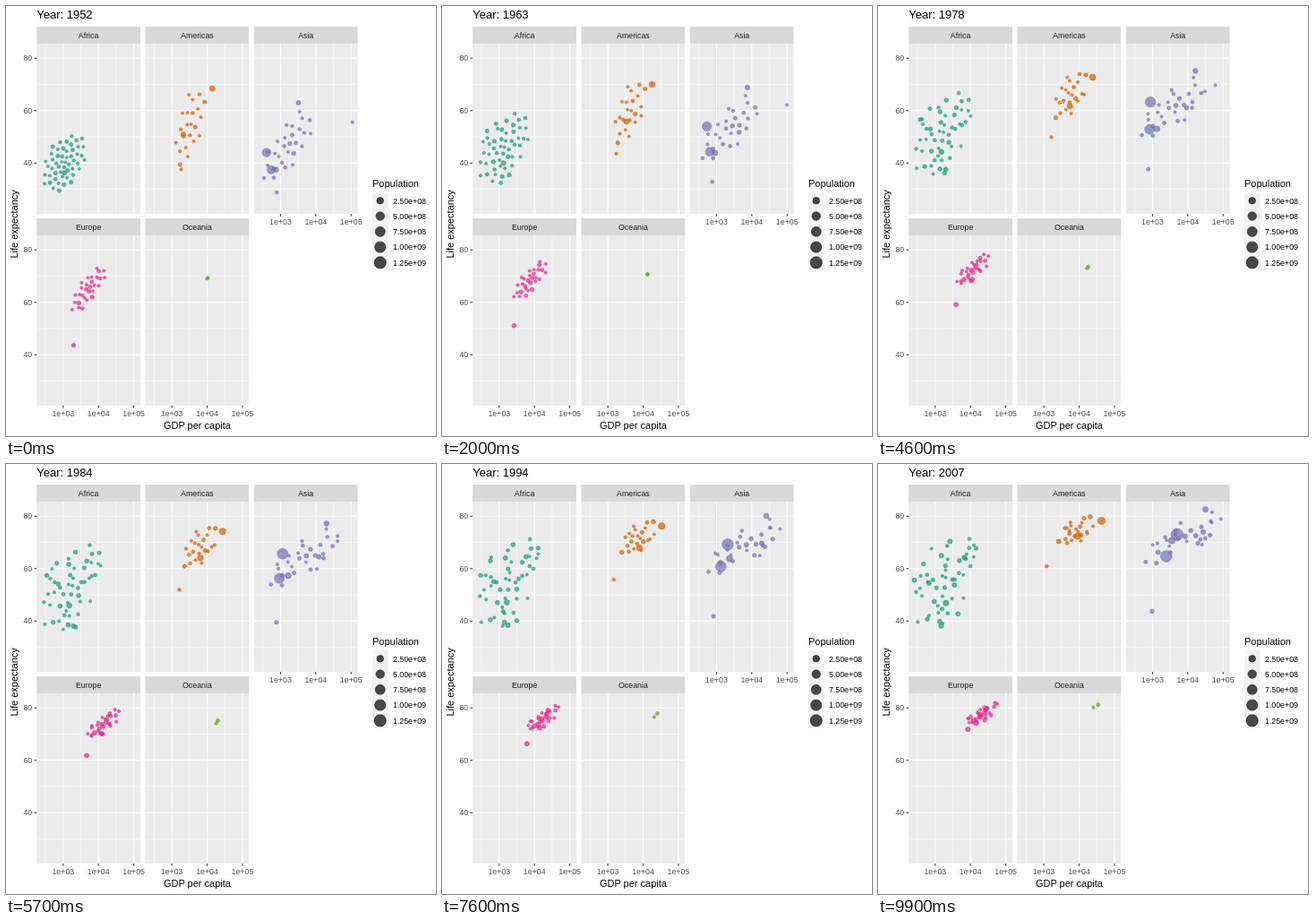
Write an HTML page that moves like this. It is 480 by 480 pixels and loops after 10000 ms.

```html
<!DOCTYPE html>
<html lang="en">
<head>
<meta charset="utf-8">
<title>Life expectancy and GDP</title>
<style>
html, body { margin: 0; width: 100%; height: 100%; overflow: hidden; background: #fff; }
svg { display: block; width: 480px; height: 480px; font-family: "Liberation Sans", Arial, sans-serif; }
</style>
</head>
<body>
<svg id="chart" viewBox="0 0 480 480"></svg>
<script>
const chart = document.getElementById("chart");
const LEFT = 34.2, TOP = 42, W = 115.8, H = 190, STEP_X = 121.3, STEP_Y = 214;

function el(tag, attrs, text) {
  const node = document.createElementNS("http://www.w3.org/2000/svg", tag);
  for (const k in attrs) node.setAttribute(k, attrs[k]);
  if (text) node.textContent = text;
  return chart.appendChild(node);
}
const rect = (x, y, width, height, fill) => el("rect", { x, y, width, height, fill });
const line = (x1, y1, x2, y2, stroke, w) => el("line", { x1, y1, x2, y2, stroke, "stroke-width": w });
const label = (x, y, s, fill = "#000", anchor = "start", size = 8.8) =>
  el("text", { x, y, fill, "text-anchor": anchor, "font-size": size }, s);
const dot = fill => el("circle", { fill, stroke: fill, "stroke-width": 0.71,
  "fill-opacity": 0.7, "stroke-opacity": 0.7 });

function place(node, cx, cy, r) {
  node.setAttribute("cx", cx);
  node.setAttribute("cy", cy);
  node.setAttribute("r", r);
}

const px = lg => (lg - 2.248) * 39.4;          // log10 of GDP
const py = life => (85.55 - life) * 2.927;
const radius = (millions, scale = 1) => 1.5 + 5.3 * scale * Math.sqrt(millions / 1319);
const mix = (a, b, f) => a + (b - a) * f;

let seed = 7;
function random() {
  seed = (seed * 16807) % 2147483647;
  return seed / 2147483647;
}

function panel(name, x, y) {
  rect(x, y - 19, W, 19, "#d9d9d9");
  label(x + W / 2, y - 6.3, name, "#1a1a1a", "middle");
  rect(x, y, W, H, "#ebebeb");
  const across = (life, w) => line(x, y + py(life), x + W, y + py(life), "#fff", w);
  const down = (lg, w) => line(x + px(lg), y, x + px(lg), y + H, "#fff", w);
  [30, 50, 70].forEach(v => across(v, 0.53));
  [2.5, 3.5, 4.5].forEach(v => down(v, 0.53));
  [40, 60, 80].forEach(v => across(v, 1.07));
  [3, 4, 5].forEach(v => down(v, 1.07));
}

function xAxis(x, y) {
  for (const e of [3, 4, 5]) {
    line(x + px(e), y, x + px(e), y + 2.75, "#333", 1.07);
    label(x + px(e), y + 12, "1e+0" + e, "#4d4d4d", "middle");
  }
}

// A country whose [GDP, life] stops are evenly spaced over the whole time span.
const along = stops => u => {
  const s = u * (stops.length - 1), i = Math.min(Math.floor(s), stops.length - 2);
  const [a, b] = [stops[i], stops[i + 1]];
  return [mix(Math.log10(a[0]), Math.log10(b[0]), s - i), mix(a[1], b[1], s - i)];
};

// Member i of a tilted cloud; from and to hold centre and spread of log GDP and life.
function member(i, { count, from, to, tilt, ease }) {
  const r = 2.2 * ((i + 0.5) / count) ** 0.6;
  const turn = 1.6 * (random() - 0.5);
  return u => {
    const f = 1 - (1 - u) ** ease;
    const [gdp, gdpSpread, life, lifeSpread] = from.map((v, k) => mix(v, to[k], f));
    const angle = 2.4 * i + turn * u;
    const zx = r * Math.cos(angle);
    const zy = tilt * zx + Math.sqrt(1 - tilt * tilt) * r * Math.sin(angle);
    return [gdp + gdpSpread * zx, life + lifeSpread * zy];
  };
}

const countries = [];

function facet(name, color, col, row, cloud, paths) {
  const x = LEFT + col * STEP_X, y = TOP + row * STEP_Y;
  panel(name, x, y);
  const add = (pop, at) => countries.push({ x, y, pop, at, node: dot(color) });
  for (let i = 0; i < cloud.count; i++) add(1 + 75 * random() ** 4, member(i, cloud));
  for (const [pop, ...stops] of paths) add(pop, along(stops));
}

facet("Africa", "#1b9e77", 0, 0,
  { count: 51, from: [3.02, 0.29, 40, 5], to: [3.25, 0.43, 55.5, 9], tilt: 0.4, ease: 2 },
  [[135, [1077, 36.3], [1500, 42.4], [1500, 47.2], [2014, 46.9]]]);

facet("Americas", "#d95f02", 1, 0,
  { count: 22, from: [3.5, 0.2, 54, 7], to: [3.92, 0.24, 74, 2.8], tilt: 0.5, ease: 1.4 },
  [[9, [1840, 37.6], [1655, 47.5], [1600, 53.6], [1202, 60.9]],
   [190, [2109, 50.9], [4500, 59], [7400, 66], [9066, 72.4]],
   [301, [13990, 68.4], [20900, 71], [30000, 75.4], [42952, 78.2]]]);

facet("Asia", "#7570b3", 2, 0,
  { count: 27, from: [3.2, 0.33, 46.5, 6.5], to: [3.85, 0.5, 71.3, 5], tilt: 0.7, ease: 1.4 },
  [[32, [779, 28.8], [750, 35.5], [770, 41], [975, 43.8]],
   [2.5, [108382, 55.6], [95000, 66.5], [30000, 74.6], [47307, 77.6]],
   [127, [3217, 63], [13000, 72.6], [23500, 79], [31656, 82.6]],
   [223, [750, 37.5], [1050, 48], [1950, 60.8], [3541, 70.7]],
   [1319, [400, 44], [640, 60.5], [1420, 67.6], [4959, 73]],
   [1110, [547, 37.4], [715, 48.8], [1020, 59.1], [2452, 64.7]]]);

facet("Europe", "#e7298a", 0, 1,
  { count: 29, from: [3.72, 0.24, 65.3, 4.2], to: [4.36, 0.23, 77.8, 2.1], tilt: 0.8, ease: 1.4 },
  [[71, [1969, 43.6], [3200, 56], [5300, 64], [8458, 71.8]]]);

facet("Oceania", "#66a61e", 1, 1, { count: 0 },
  [[20, [10040, 69.1], [15900, 71.6], [22000, 76.5], [34435, 81.2]],
   [4, [10557, 69.4], [15500, 71.7], [18900, 74.9], [25185, 80.2]]]);

// axes
xAxis(LEFT, TOP + STEP_Y + H);
xAxis(LEFT + STEP_X, TOP + STEP_Y + H);
xAxis(LEFT + 2 * STEP_X, TOP + H);
for (const top of [TOP, TOP + STEP_Y])
  for (const life of [40, 60, 80]) {
    const y = top + py(life);
    line(LEFT - 2.75, y, LEFT, y, "#333", 1.07);
    label(29.2, y + 3.1, life, "#4d4d4d", "end");
  }
label(213.4, 472, "GDP per capita", "#000", "middle", 11);
label(0, 0, "Life expectancy", "#000", "middle", 11)
  .setAttribute("transform", "translate(13.3 243.4) rotate(-90)");

// legend
label(409, 202, "Population", "#000", "start", 11);
["2.50e+08", "5.00e+08", "7.50e+08", "1.00e+09", "1.25e+09"].forEach((s, i) => {
  const y = 217.3 + i * 17.28;
  rect(409, y - 8.64, 17.28, 17.28, "#f2f2f2");
  place(dot("#000"), 417.7, y, radius(s / 1e6));
  label(432, y + 3.2, s);
});

const title = label(LEFT, 14, "Year: 1952", "#000", "start", 13);

function draw(now) {
  const u = Math.floor(now / 100) % 100 / 99;
  title.textContent = "Year: " + Math.round(mix(1952, 2007, u));
  for (const { x, y, pop, at, node } of countries) {
    const [gdp, life] = at(u);
    place(node, x + px(gdp), y + py(life), radius(pop, mix(0.62, 1, u)));
  }
  requestAnimationFrame(draw);
}
draw(0);
</script>
</body>
</html>
```
